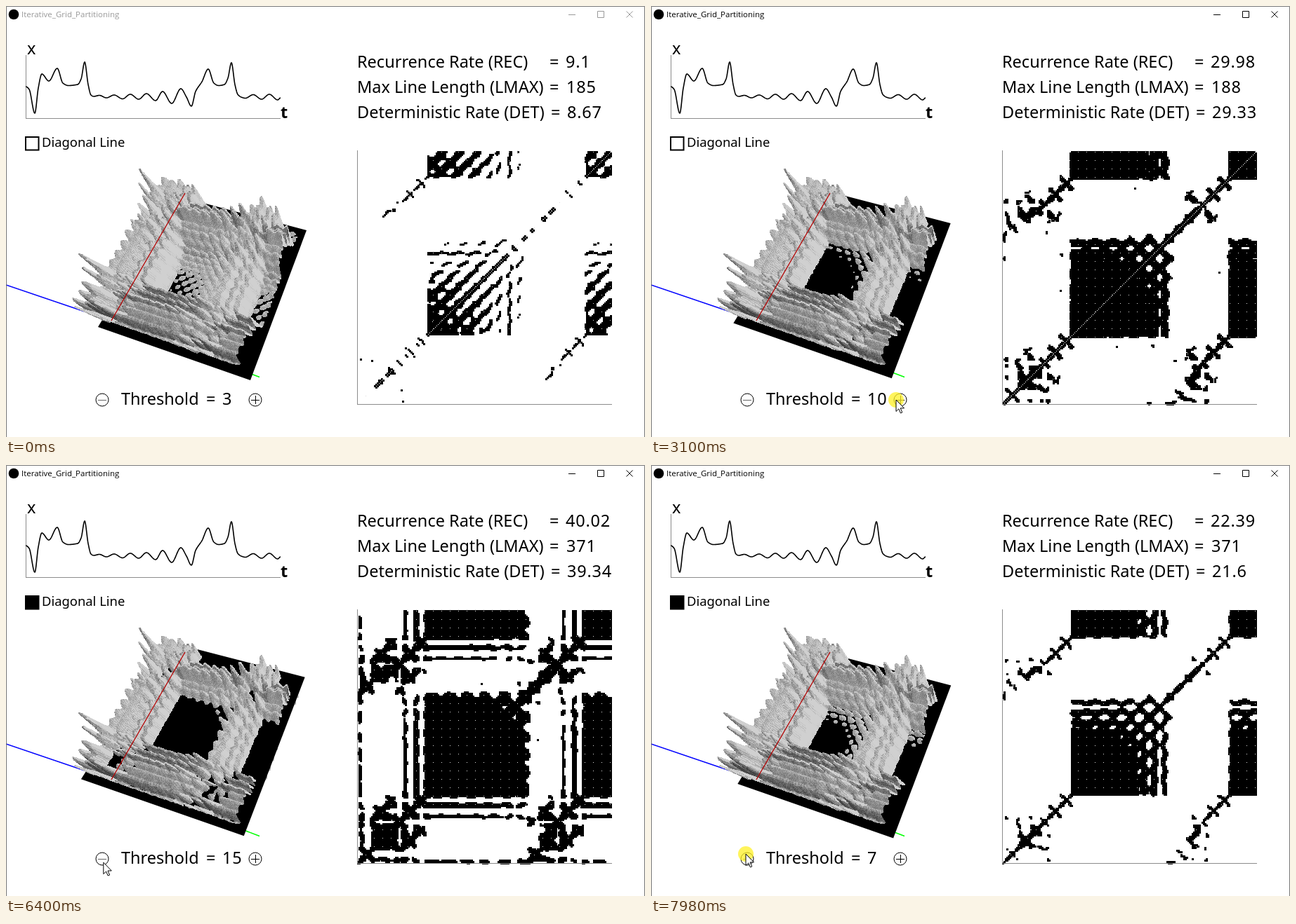
Recreate the animation shown at these times as an HTML page with a canvas. Size 910 by 615 pixels, loop 8 s.

```html
<!DOCTYPE html>
<html lang="en">
<head>
<meta charset="utf-8">
<title>Recurrence demo</title>
<style>
html, body { margin: 0; width: 100%; height: 100%; overflow: hidden; background: #fff; }
#stage { position: relative; width: 910px; height: 615px; overflow: hidden; background: #fff; }
#stage > * { position: absolute; left: 0; top: 0; }
#plot { left: 500px; top: 206px; }
text { font: 23.5px "Noto Sans", "Open Sans", sans-serif; white-space: pre; }
.num { letter-spacing: .8px; }
.thin { fill: none; stroke: #000; stroke-width: 1; }
.axis { fill: none; stroke: #8c8c8c; stroke-width: 1; }
#bar { color: #999; }
#bar text { font: 11.5px "Open Sans", sans-serif; fill: currentColor; }
#bar path { fill: none; stroke: currentColor; }
</style>
</head>
<body>
<div id="stage">
  <svg width="910" height="615">
    <path d="M0 398L150 449" stroke="#00f" stroke-width="1.5"/>
    <path d="M150 449L361 529.5" stroke="#0f0" stroke-width="1.5"/>
  </svg>
  <canvas id="scene" width="910" height="615"></canvas>
  <canvas id="plot" width="365" height="365"></canvas>
  <svg width="910" height="615">
    <path d="M.5 615V.5H909.5V615" fill="none" stroke="#777"/>
    <g id="bar">
      <circle cx="11" cy="12" r="7.3"/>
      <text x="22" y="16">Iterative_Grid_Partitioning</text>
      <path d="M801 12.5h10M842.5 7.5h9v9h-9zM883.5 7.5l9 9m0-9l-9 9"/>
    </g>

    <path class="axis" d="M28.5 70V160M28 160.500H391"/>
    <path id="wave" fill="none" stroke="#000" stroke-width="1.6"/>
    <text x="30" y="69">x</text>
    <text x="391" y="160" style="font-weight:600">t</text>

    <rect id="box" x="28" y="187" width="18.500" height="18.500" fill="none" stroke="#000" stroke-width="2"/>
    <text x="51" y="201" style="font-size:18.4px">Diagonal Line</text>

    <text x="500" y="88">Recurrence Rate (REC)</text><text x="774" y="88">=</text>
    <text x="500" y="124">Max Line Length (LMAX)</text><text x="774" y="124">=</text>
    <text x="500" y="160">Deterministic Rate (DET)</text><text x="776" y="160">=</text>
    <text class="num" id="rec" x="797" y="88"></text>
    <text class="num" id="lmax" x="798" y="124"></text>
    <text class="num" id="det" x="799" y="160"></text>

    <path class="axis" d="M500.500 206V569M500 568.500H863"/>
    <path d="M150 449L255 267" stroke="#b40000" stroke-width="1.3"/>

    <text x="164" y="569">Threshold</text><text x="285" y="569">=</text>
    <text class="num" id="thr" x="308" y="569"></text>
    <circle class="thin" cx="137" cy="562" r="9"/>
    <path class="thin" stroke-opacity=".6" d="M131 562.500h12"/>
    <circle class="thin" cx="355" cy="562" r="9"/>
    <path class="thin" d="M349 562.500h12M355.500 556v12"/>

    <g id="lens">
      <rect x="349" y="521" width="27" height="27" rx="4" fill="#f44c4e"/>
      <path d="M365.500 538l5 5M366.500 533.500a5.500 5.500 0 1 1-11 0a5.500 5.500 0 1 1 11 0z" fill="none" stroke="#fff" stroke-width="1.6"/>
    </g>
    <g id="cursor">
      <circle id="halo" r="11" fill="#fff025" fill-opacity=".75"/>
      <path d="M0 0V16.500l3.800-3.600 2.600 6 2.400-1-2.600-6h5.300z" fill="#fff" stroke="#000"/>
    </g>
  </svg>
</div>
<script>
const $ = id => document.getElementById(id);
const clamp = (v, a, b) => Math.max(a, Math.min(b, v));
const mix = (a, b, p) => a + (b - a) * p;

// The signal: monotone cubic through its turning points
const PTS = [28,115, 33,119, 41,153, 46,117, 51,97, 61,107, 73,89, 81,110, 89,113.5,
  102,112, 107,104, 112,80, 117,112, 121,127, 125,129, 133,127.5, 143,131, 154,127,
  166,132.5, 177,126, 189,133, 200,125, 213,135, 223,122, 236,139, 249,118, 257,130,
  264,143, 270,122, 279,108, 288,90, 296,110, 303,113.5, 311,112, 316,103, 321,81,
  326,112, 330,126, 335,130, 341,131.5, 352,126.5, 364,133, 375,126, 387,134, 391,131];
const px = PTS.filter((_, k) => k % 2 === 0), py = PTS.filter((_, k) => k % 2);
const rise = k => (py[k + 1] - py[k]) / (px[k + 1] - px[k]);
const slope = px.map((_, k) => {
  if (k === 0 || k === px.length - 1) return 0;
  const a = rise(k - 1), b = rise(k);
  return a * b > 0 ? 2 * a * b / (a + b) : 0;
});
function signal(x) {
  let k = 0;
  while (k < px.length - 2 && px[k + 1] < x) k++;
  const h = px[k + 1] - px[k], p = clamp((x - px[k]) / h, 0, 1), q = 1 - p;
  return q * q * ((1 + 2 * p) * py[k] + p * h * slope[k])
    + p * p * ((3 - 2 * p) * py[k + 1] - q * h * slope[k + 1]);
}
let wave = 'M28 ' + signal(28);
for (let x = 28.5; x <= 391; x += .5) wave += `L${x} ${signal(x).toFixed(2)}`;
$('wave').setAttribute('d', wave);

// Distances between delay-embedded states
const N = 181, SPAN = 334, LAG = 14.5, UNIT = 2;
const state = Array.from({ length: N }, (_, k) =>
  [0, 1, 2].map(m => signal(28 + k * SPAN / (N - 1) + m * LAG)));
const dist = new Float32Array(N * N);
for (let i = 0; i < N; i++)
  for (let j = 0; j < N; j++)
    dist[i * N + j] = Math.hypot(...state[i].map((s, m) => s - state[j][m])) / UNIT;
const at = (i, j) => dist[clamp(i, 0, N - 1) * N + clamp(j, 0, N - 1)];

// Perspective: u, v across the plate, z towards the viewer
function project(u, v, z) {
  const lift = .0056 * (z - 3), w = 1 - .079 * u + .207 * v - lift;
  return [(131 + 189.5 * u + 162.3 * v - 465 * lift) / w,
    (458 + 33.8 * u - 130.9 * v - 593 * lift) / w, w];
}

const W = 450, H = 340, TOP = 205;
const depth = new Float32Array(W * H).fill(Infinity);
const height = new Float32Array(W * H), shade = new Uint8Array(W * H);
const inset = k => .045 + .905 * k / (N - 1);
const vertex = (i, j) => project(inset(i), inset(j), at(i, j));

function splat(x, y, w, z, g) {
  for (let dy = 0; dy < 2; dy++)
    for (let dx = 0; dx < 2; dx++) {
      const X = Math.floor(x) + dx, Y = Math.floor(y) - TOP + dy, k = Y * W + X;
      if (X < 0 || Y < 0 || X >= W || Y >= H || w >= depth[k]) continue;
      depth[k] = w; height[k] = z; shade[k] = g;
    }
}
function edge(i, j, i2, j2, g) {
  const a = vertex(i, j), b = vertex(i2, j2), za = at(i, j), zb = at(i2, j2);
  const n = Math.ceil(Math.max(Math.abs(a[0] - b[0]), Math.abs(a[1] - b[1]))) + 1;
  for (let k = 0; k <= n; k++) {
    const p = k / n;
    splat(mix(a[0], b[0], p), mix(a[1], b[1], p), mix(a[2], b[2], p), mix(za, zb, p), g);
  }
}
for (let i = 0; i < N; i++)
  for (let j = 0; j < N; j++) {
    const du = at(i + 1, j) - at(i - 1, j), dv = at(i, j + 1) - at(i, j - 1);
    const base = mix(132, 178, Math.min(1, j / 45));
    const g = clamp(base - 8 * dv - 4 * du + ((i + j) % 2 ? 13 : -13), 65, 208);
    if (i < N - 1) edge(i, j, i + 1, j, g);
    if (j < N - 1) edge(i, j, i, j + 1, g);
  }

function layer(minZ) {
  const c = document.createElement('canvas');
  c.width = W; c.height = H;
  const g = c.getContext('2d'), img = g.createImageData(W, H);
  for (let k = 0; k < W * H; k++) {
    if (depth[k] === Infinity || height[k] < minZ) continue;
    img.data.fill(shade[k], 4 * k, 4 * k + 3);
    img.data[4 * k + 3] = 255;
  }
  g.putImageData(img, 0, 0);
  return c;
}
const surface = layer(-1), scene = $('scene').getContext('2d'), plot = $('plot').getContext('2d');

function drawScene(thr) {
  scene.clearRect(0, 0, 910, 615);
  scene.drawImage(surface, 0, TOP);
  scene.fillStyle = '#000';
  scene.beginPath();
  for (const [u, v] of [[0, 0], [1, 0], [1, 1], [0, 1]]) {
    const p = project(u, v, thr);
    scene.lineTo(p[0], p[1]);
  }
  scene.fill();
  scene.drawImage(layer(thr), 0, TOP);
}
function drawPlot(thr, diagonal) {
  plot.clearRect(0, 0, 365, 365);
  plot.fillStyle = '#000';
  for (let i = 0; i < N; i++)
    for (let j = 0; j < N; j++)
      if (at(i, j) < thr && (diagonal || i !== j)) plot.fillRect(2 * i, 361 - 2 * j, 3, 3);
  plot.fillStyle = '#ddd';
  for (let x = 12; x < 362; x += 12)
    for (let y = 12; y < 362; y += 12)
      if (at(x / 2, y / 2) < thr) plot.fillRect(x, 362 - y, 1, 1);
}

// Readouts for thresholds 3 to 15
const REC = [9.1, 12.83, 16.41, 19.67, 22.39, 25.1, 27.62, 29.98, 32.2, 34.25, 36.24, 38.15, 40.02];
const DET = [8.67, 12.2, 15.72, 18.92, 21.6, 24.37, 26.95, 29.33, 31.6, 33.73, 35.66, 37.52, 39.34];

const UP = [1790, 2020, 2250, 2490, 2640, 2870, 3100, 3220, 3330, 3560, 3720, 3790];
const DOWN = [6800, 6960, 7120, 7280, 7430, 7670, 7830, 7980];
const CLICKS = [1710, 6720, ...UP, ...DOWN];
const PATH = [[710, 276, 603], [1000, 358, 554], [1240, 349, 562], [4180, 349, 562],
  [5020, 41, 189], [5120, 36, 193], [5650, 36, 193], [6150, 118, 592], [6340, 141, 574],
  [6490, 135, 555], [8000, 135, 555]];

function cursorAt(t) {
  let k = 0;
  while (k < PATH.length - 2 && PATH[k + 1][0] <= t) k++;
  const [a, b] = [PATH[k], PATH[k + 1]];
  const p = clamp((t - a[0]) / (b[0] - a[0]), 0, 1), e = p * p * (3 - 2 * p);
  return [mix(a[1], b[1], e), mix(a[2], b[2], e)];
}
const show = (id, on) => $(id).setAttribute('visibility', on ? 'visible' : 'hidden');
const passed = (list, t) => list.filter(c => c <= t).length;

let drawnThr, drawnKey;
function frame() {
  const t = performance.now() % 8000;
  const thr = 3 + passed(UP, t) - passed(DOWN, t), diagonal = t >= 5420;
  const key = thr + '/' + diagonal;
  if (thr !== drawnThr) {
    drawScene(thr);
    $('thr').textContent = thr;
    $('rec').textContent = REC[thr - 3];
    $('det').textContent = DET[thr - 3];
    drawnThr = thr;
  }
  if (key !== drawnKey) {
    drawPlot(thr, diagonal);
    $('lmax').textContent = diagonal || thr > 14 ? 371 : thr > 9 ? 188 : 185;
    $('box').setAttribute('fill', diagonal ? '#000' : 'none');
    drawnKey = key;
  }
  $('bar').style.color = t < 1710 ? '#999' : '#000';
  show('cursor', t >= 710);
  show('halo', CLICKS.some(c => t >= c && t < c + 80) || t >= 5250 && t < 5500);
  show('lens', t >= 3870 && t < 5100);
  const [x, y] = cursorAt(t);
  $('cursor').setAttribute('transform', `translate(${x.toFixed(1)} ${y.toFixed(1)})`);
  requestAnimationFrame(frame);
}
frame();
</script>
</body>
</html>
```
